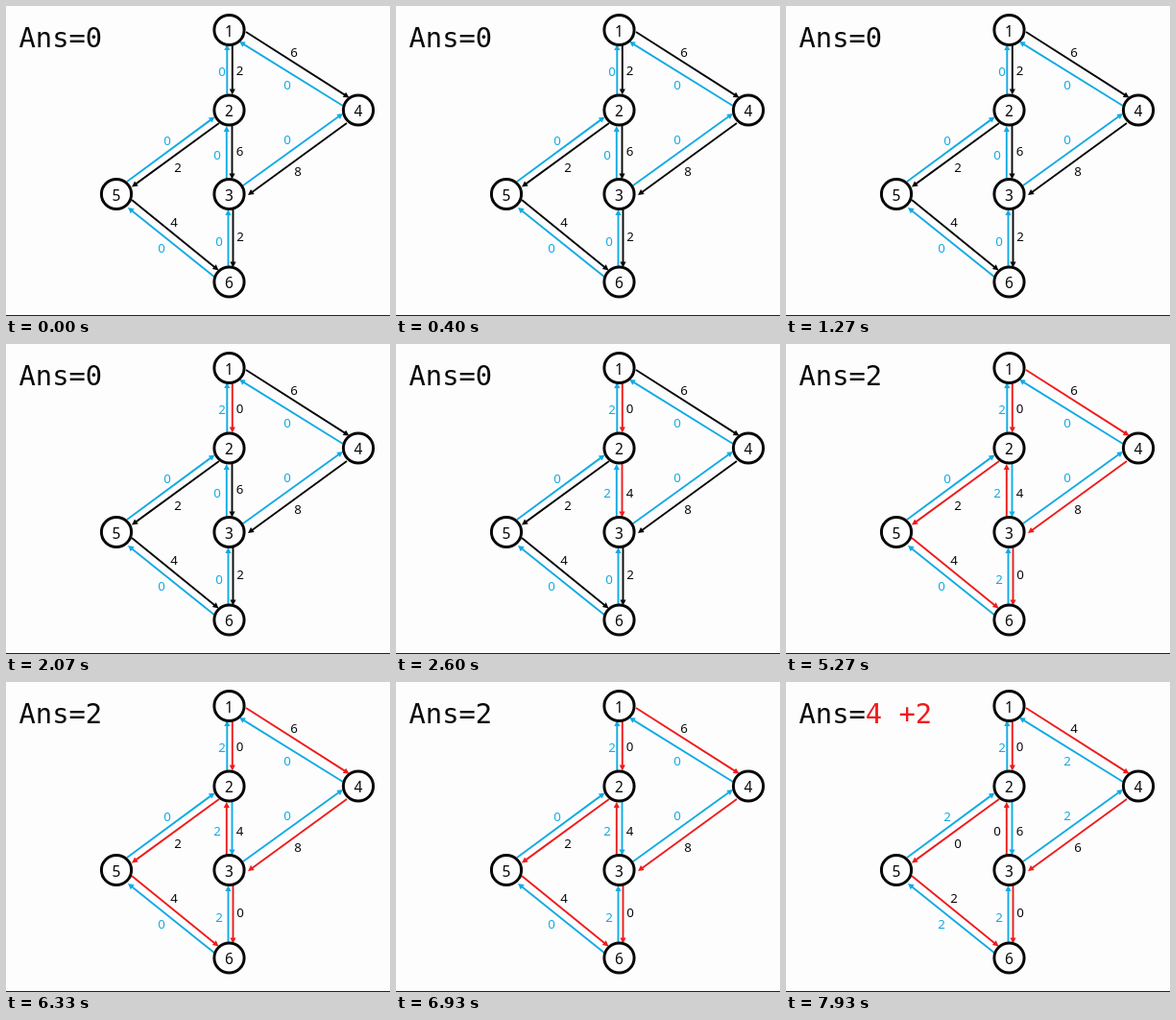
Write an HTML page with a canvas that moves like this. It is 400x323 px and loops after 8 s.

```html
<!DOCTYPE html>
<html lang="en">
<head>
<meta charset="utf-8">
<title>Maximum flow</title>
<style>
html, body { margin: 0; width: 100%; height: 100%; overflow: hidden; background: #fefdfe; }
canvas { display: block; }
</style>
</head>
<body>
<canvas id="stage" width="400" height="323"></canvas>
<script>
const ctx = document.getElementById('stage').getContext('2d');
const BLACK = '#080808', BLUE = '#12abe4', RED = '#ee1c1c';
const LOOP = 8000;
// Times at which each step of the algorithm appears
const STEP = { first: 1470, second: 2470, third: 3470, path: 4470, update: 7670 };

const nodes = [[232.5, 25], [232.5, 108.5], [232.5, 196], [367, 108.5], [115, 196], [232.5, 287.5]];

function text(str, x, y, size, color, family = '"Noto Sans", sans-serif') {
  ctx.font = `${size}px ${family}`;
  ctx.fillStyle = color;
  ctx.fillText(str, x, y);
}

function label(value, x, y, color) {
  ctx.textAlign = 'center';
  text(value, x, y + 4.8, 13.3, color);
}

function arrow(x1, y1, x2, y2, color) {
  const length = Math.hypot(x2 - x1, y2 - y1);
  ctx.save();
  ctx.translate(x1, y1);
  ctx.rotate(Math.atan2(y2 - y1, x2 - x1));
  ctx.strokeStyle = ctx.fillStyle = color;
  ctx.lineWidth = 1.9;
  ctx.beginPath();
  ctx.moveTo(0, 0);
  ctx.lineTo(length - 4, 0);
  ctx.stroke();
  ctx.beginPath();
  ctx.moveTo(length, 0);
  ctx.lineTo(length - 6, -3.1);
  ctx.lineTo(length - 6, 3.1);
  ctx.fill();
  ctx.restore();
}

function node([x, y], i) {
  ctx.beginPath();
  ctx.arc(x, y, 15.6, 0, Math.PI * 2);
  ctx.fillStyle = '#fefefe';
  ctx.fill();
  ctx.lineWidth = 3;
  ctx.strokeStyle = BLACK;
  ctx.stroke();
  ctx.textAlign = 'center';
  text(i + 1, x, y + 6.5, 15.5, BLACK);
}

function answer(t) {
  const adding = t >= STEP.third && t < STEP.path || t >= STEP.update;
  const total = t < STEP.third ? 0 : t < STEP.update ? 2 : 4;
  const mono = '"DejaVu Sans Mono", monospace';
  ctx.textAlign = 'left';
  text('Ans=', 13.5, 42.5, 28.8, BLACK, mono);
  const x = 13.5 + ctx.measureText('Ans=').width;
  text(total + (adding ? ' +2' : ''), x, 42.5, 28.8, adding ? RED : BLACK, mono);
}

function draw(t) {
  const a = t >= STEP.first, b = t >= STEP.second, c = t >= STEP.third;
  const path = t >= STEP.path, done = t >= STEP.update;
  const used = on => on ? RED : BLACK;

  ctx.fillStyle = '#fefdfe';
  ctx.fillRect(0, 0, 400, 323);

  // Residual edges
  arrow(230.3, 92, 230.3, 40, BLUE);
  arrow(229.8, 180, 229.8, 125, path ? RED : BLUE);
  arrow(231.5, 271, 231.5, 212, BLUE);
  arrow(351, 104, 243, 37, BLUE);
  arrow(126, 183, 217.5, 115.5, BLUE);
  arrow(247, 187, 351, 112, BLUE);
  arrow(218, 283, 127, 210, BLUE);

  // Forward edges
  arrow(235.8, 40, 235.8, 92.5, used(a));
  arrow(235.5, 125, 235.5, 180.5, path ? BLUE : used(b));
  arrow(236.5, 212, 236.5, 272.5, used(c));
  arrow(250, 27, 357.5, 95.5, used(path));
  arrow(222, 122, 131, 188.5, used(path));
  arrow(355, 122, 252, 197, used(path));
  arrow(131, 202, 221.5, 275.5, used(path));

  nodes.forEach(node);

  // Flow labels
  const flow = done ? 2 : 0;
  label(a ? 2 : 0, 225, 68, BLUE);
  label(done ? 0 : b ? 2 : 0, 220, 155, done ? BLACK : BLUE);
  label(c ? 2 : 0, 222, 245, BLUE);
  label(flow, 293, 82, BLUE);
  label(flow, 168, 140, BLUE);
  label(flow, 293, 139, BLUE);
  label(flow, 162, 252, BLUE);

  // Remaining capacity labels
  label(a ? 0 : 2, 243.5, 67, BLACK);
  label(b && !done ? 4 : 6, 243.5, b ? 155 : 151.5, BLACK);
  label(c ? 0 : 2, 244, 240, BLACK);
  label(6 - flow, 300, 48, BLACK);
  label(2 - flow, 179, 168, BLACK);
  label(8 - flow, 304, 172, BLACK);
  label(4 - flow, 175, 225, BLACK);

  answer(t);

  ctx.fillStyle = '#222';
  ctx.fillRect(0, 322, 400, 1);
}

const start = performance.now();
function tick() {
  draw((performance.now() - start) % LOOP);
  requestAnimationFrame(tick);
}
tick();
</script>
</body>
</html>
```
